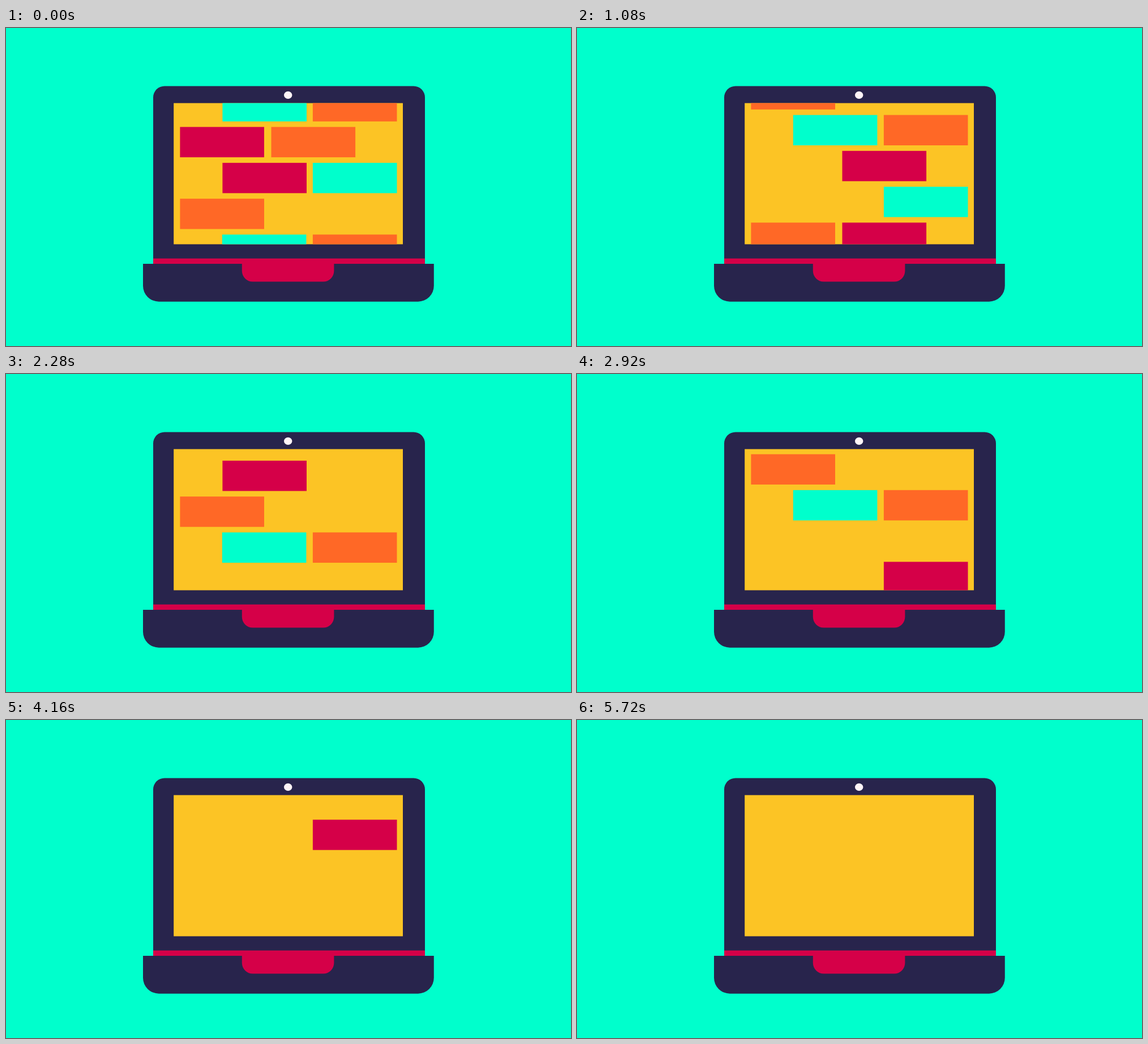
An HTML page that plays this animation: 998x561 px, repeating every 5.76 s.

```html
<!DOCTYPE html>
<html lang="en">
<head>
<meta charset="utf-8">
<title>Laptop</title>
<style>
html, body { margin: 0; width: 100%; height: 100%; overflow: hidden; background: #00ffcc; }
svg { display: block; width: 998px; height: 561px; }
</style>
</head>
<body>
<svg viewBox="0 0 998 561">
  <clipPath id="screen"><rect x="296.2" y="132.5" width="404.8" height="249"/></clipPath>
  <path fill="#28244c" d="M260 416V122.5a20 20 0 0 1 20-20H720a20 20 0 0 1 20 20V416z"/>
  <ellipse cx="498.2" cy="118.4" rx="7.2" ry="6.6" fill="#fff5f7"/>
  <rect x="296.2" y="132.5" width="404.8" height="249" fill="#fcc425"/>
  <g clip-path="url(#screen)"><g id="wall"></g></g>
  <rect x="260" y="406.6" width="480" height="10" fill="#d50048"/>
  <path fill="#28244c" d="M242 416H755.8V454.7a28 28 0 0 1-28 28H270a28 28 0 0 1-28-28z"/>
  <path fill="#d50048" d="M416.8 415.5H579.4V428.6a19 19 0 0 1-19 19H435.8a19 19 0 0 1-19-19z"/>
</svg>
<script>
const LOOP = 5760;
const COLORS = { r: '#d50048', o: '#ff6826', t: '#00ffcc' };
const COLUMNS = { A: 307.4, B: 382.4, b: 381.8, C: 468.5, D: 541.9 };
// One entry per row: column letter followed by colour letter
const ROWS = ['BtDo', 'ArCo', 'BrDt', 'Ao', 'btDo', 'Cr', 'Dt', 'AoCr',
              'Bt', '', 'Br', 'Ao', 'btDo', '', 'Dr'];
const wall = document.getElementById('wall');

ROWS.forEach((row, i) => {
  for (const [column, color] of row.match(/../g) || []) {
    const brick = document.createElementNS('http://www.w3.org/2000/svg', 'rect');
    const attrs = { x: COLUMNS[column], y: 111.3 + 63.28 * i, width: 148.6, height: 53.5, fill: COLORS[color] };
    for (const name in attrs) brick.setAttribute(name, attrs[name]);
    wall.append(brick);
  }
});

function ease(t, start, length) {
  const u = Math.min(1, Math.max(0, (t - start) / length));
  return u * u * (3 - 2 * u);
}

function draw(now) {
  const t = now % LOOP;
  const scroll = 665.6 * ease(t, 0, 2880) + 256.6 * ease(t, 2880, 2240);
  wall.setAttribute('transform', `translate(0 ${-scroll})`);
}

const start = performance.now();
function tick() {
  draw(performance.now() - start);
  requestAnimationFrame(tick);
}
tick();
</script>
</body>
</html>
```
